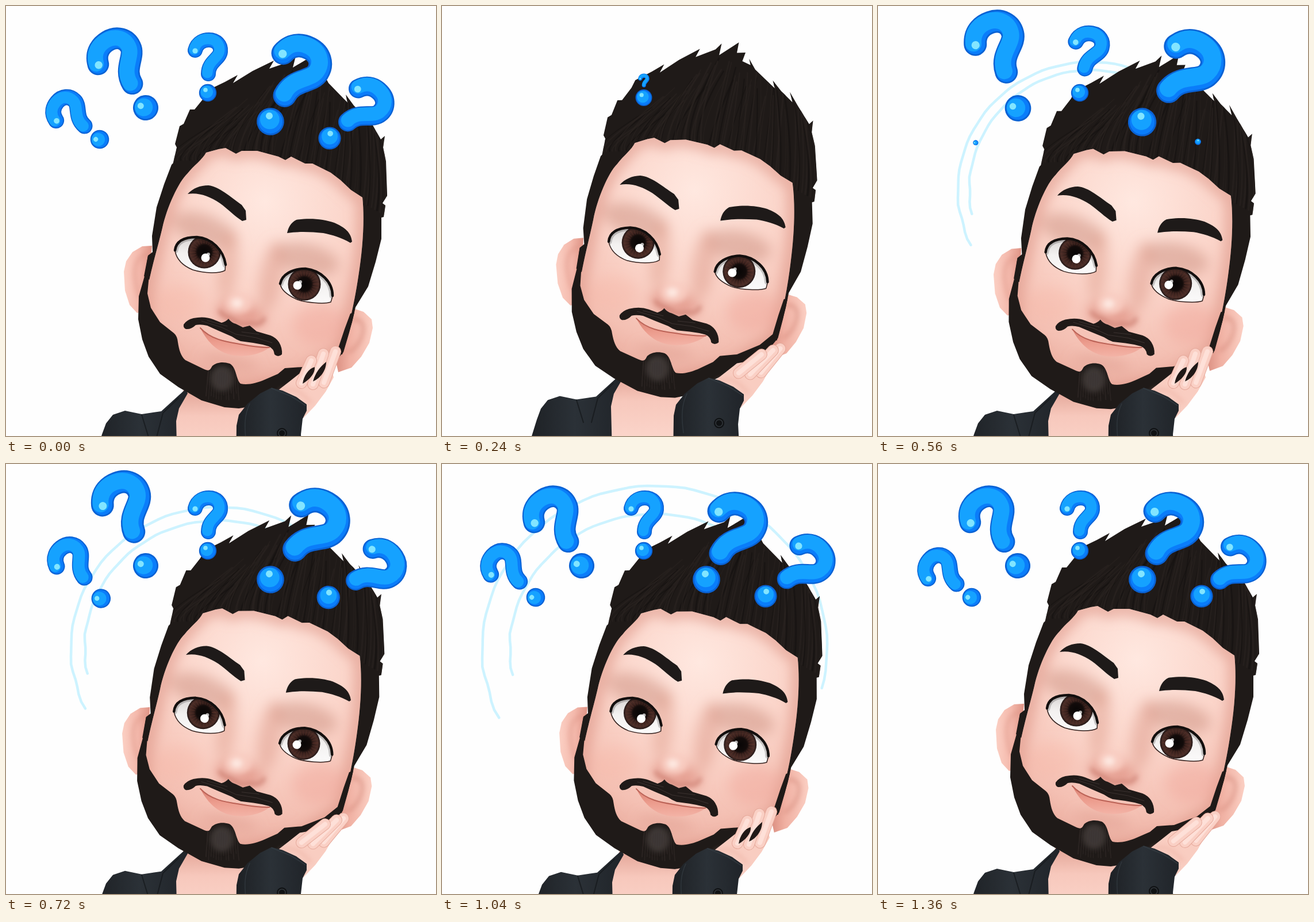
An HTML page for the animation above (1.44 s loop, 748 by 748 pixels).

```html
<!DOCTYPE html>
<html lang="en">
<head>
<meta charset="utf-8">
<title>Thinking</title>
<style>
html, body { margin: 0; width: 100%; height: 100%; overflow: hidden; background: #fefefe; }
svg { display: block; width: 100%; height: 100%; }
</style>
</head>
<body>
<svg viewBox="0 0 748 748" stroke-linecap="round" stroke-linejoin="round">
  <defs>
    <radialGradient id="skin" gradientUnits="userSpaceOnUse" cx="450" cy="340" r="335">
      <stop offset="0" stop-color="#ffe8e0"/><stop offset=".45" stop-color="#fbd5ca"/>
      <stop offset=".8" stop-color="#f4c0b3"/><stop offset="1" stop-color="#e9ab9d"/>
    </radialGradient>
    <radialGradient id="iris">
      <stop offset="0" stop-color="#090606"/><stop offset=".42" stop-color="#120b0a"/>
      <stop offset=".6" stop-color="#38201c"/><stop offset=".85" stop-color="#4b2d27"/>
      <stop offset="1" stop-color="#241817"/>
    </radialGradient>
    <linearGradient id="white" x2="0" y2="1">
      <stop offset="0" stop-color="#d8d4d3"/><stop offset=".45" stop-color="#f3f1f0"/><stop offset="1" stop-color="#fbfafa"/>
    </linearGradient>
    <linearGradient id="ear" x2="1" y2="0">
      <stop offset="0" stop-color="#fbcfc3"/><stop offset=".55" stop-color="#f4b9ac"/><stop offset="1" stop-color="#df9486"/>
    </linearGradient>
    <linearGradient id="earR" x1="1" x2="0" y2="0">
      <stop offset="0" stop-color="#fbcfc3"/><stop offset=".6" stop-color="#f0b0a2"/><stop offset="1" stop-color="#d88b7d"/>
    </linearGradient>
    <linearGradient id="neckFill" x2="0" y2="1">
      <stop offset="0" stop-color="#dd9b8d"/><stop offset=".4" stop-color="#f7c8bc"/><stop offset="1" stop-color="#fcd9cf"/>
    </linearGradient>
    <linearGradient id="lip" x2="0" y2="1">
      <stop offset="0" stop-color="#d97f70"/><stop offset=".5" stop-color="#ec9c8d"/><stop offset="1" stop-color="#f3b3a6"/>
    </linearGradient>
    <linearGradient id="cloth" x2="1" y2="0">
      <stop offset="0" stop-color="#1d2024"/><stop offset=".5" stop-color="#2b3137"/><stop offset="1" stop-color="#202429"/>
    </linearGradient>
    <filter id="soft" x="-60%" y="-60%" width="220%" height="220%"><feGaussianBlur stdDeviation="11"/></filter>
    <filter id="faint" x="-60%" y="-60%" width="220%" height="220%"><feGaussianBlur stdDeviation="4"/></filter>
    <path id="hairShape" d="M240,470 L247,434 255,428 254,400 262,350 275,310 288,276 302,262 290,276 297,246 294,240 302,209 309,205 320,180 328,180 345,159 352,146 381,132 403,120 395,134 429,113 466,95 458,109 493,97 504,87 499,107 516,97 534,86 530,104 545,104 539,119 553,126 551,115 561,134 594,168 591,154 605,173 624,193 620,175 633,199 652,232 659,226 656,246 661,270 662,300 663,330 655,343 660,347 657,367 653,368 653,405 643,445 630,488 608,524 602,550 585,606 430,600Z"/>
    <path id="faceShape" d="M348,255 L370,249 382,247 400,257 410,252 437,252 474,262 486,268 496,262 520,274 533,274 547,281 565,290 582,303 600,320 620,333 C624,370 621,420 613,470 C607,510 598,555 582,602 L510,650 400,675 300,645 240,560 245,500 C250,465 264,420 272,386 C280,350 300,306 316,291 C326,278 342,267 348,255Z"/>
    <path id="eyeL" d="M294,426 C296,408 312,402 332,402 C358,404 378,424 382,448 L381,460 C370,466 345,465 325,459 C308,452 297,442 294,426Z"/>
    <path id="eyeR" d="M477,484 C480,467 498,457 521,457 C548,460 568,480 569,502 L565,515 C553,519 520,516 505,510 C488,502 479,494 477,484Z"/>
    <path id="beardShape" d="M259,430 L247,435 241,470 231,505 230,545 237,580 248,610 268,640 300,663 340,686 380,698 405,700 430,696 462,676 520,651 562,631 587,602 597,568 606,533 599,535 589,562 578,595 555,613 515,628 485,630 473,640 450,650 C436,656 420,660 408,657 C400,650 401,628 389,622 C377,618 366,620 359,626 C355,632 355,637 343,631 L312,616 C304,609 301,598 299,585 Q298,574 292,569 L268,550 252,525 246,500 249,468Z"/>
    <clipPath id="hairClip"><use href="#hairShape"/></clipPath>
    <clipPath id="faceClip"><use href="#faceShape"/></clipPath>
    <clipPath id="beardClip"><use href="#beardShape"/></clipPath>
    <clipPath id="clipL"><use href="#eyeL"/></clipPath>
    <clipPath id="clipR"><use href="#eyeR"/></clipPath>
  </defs>
  <rect width="748" height="748" fill="#fefefe"/>
  <g id="rings" fill="none" stroke="#cdf3ff" stroke-width="4.5"></g>

  <g id="body">
    <path d="M314,655 L300,690 284,800 430,800 414,690Z" fill="url(#neckFill)"/>
    <path d="M150,800 L167,745 174,726 186,711 207,704 236,710 270,705 292,685 313,666 316,674 301,700 296,722 298,800Z" fill="url(#cloth)"/>
    <path d="M300,682 L273,708 262,750 M236,711 L248,750" fill="none" stroke="#15181b" stroke-width="2" opacity=".7"/>
  </g>

  <g id="head">
    <path d="M254,417 L237,418 220,428 209,444 205,462 207,495 215,520 228,534 245,530Z" fill="url(#ear)"/>
    <path d="M246,432 C225,436 221,460 226,482 C228,498 232,505 236,508" fill="none" stroke="#d98f80" stroke-width="5" opacity=".55" filter="url(#faint)"/>
    <path d="M604,526 L622,532 636,545 638,560 632,586 618,610 601,629 578,637 570,600Z" fill="url(#earR)"/>
    <path d="M604,545 C622,544 625,560 618,577 C612,592 603,598 597,602" fill="none" stroke="#cd8071" stroke-width="5" opacity=".6" filter="url(#faint)"/>
    <use href="#hairShape" fill="#1f1a18"/>
    <g id="strands" clip-path="url(#hairClip)" fill="none"></g>
    <use href="#faceShape" fill="url(#skin)"/>
    <g clip-path="url(#faceClip)">
      <g filter="url(#soft)">
        <use href="#faceShape" fill="none" stroke="#d98e7f" stroke-width="22" opacity=".6"/>
        <ellipse cx="345" cy="390" rx="58" ry="27" transform="rotate(20 345 390)" fill="#cf9586" opacity=".55"/>
        <ellipse cx="522" cy="440" rx="58" ry="27" transform="rotate(13 522 440)" fill="#cf9586" opacity=".55"/>
        <ellipse cx="386" cy="450" rx="17" ry="62" transform="rotate(6 386 450)" fill="#e0a090" opacity=".5"/>
        <ellipse cx="462" cy="470" rx="20" ry="62" transform="rotate(10 462 470)" fill="#e0a090" opacity=".55"/>
        <ellipse cx="303" cy="515" rx="42" ry="30" fill="#f5aea0" opacity=".25"/>
        <ellipse cx="545" cy="555" rx="46" ry="34" fill="#f0a598" opacity=".4"/>
        <ellipse cx="409" cy="537" rx="44" ry="21" transform="rotate(14 409 537)" fill="#de8e7f" opacity=".7"/>
        <ellipse cx="390" cy="620" rx="50" ry="11" transform="rotate(10 390 620)" fill="#dd9c8d" opacity=".5"/>
      </g>
    </g>

    <use href="#beardShape" fill="#1f1a18"/>
    <g clip-path="url(#beardClip)">
      <ellipse cx="376" cy="648" rx="20" ry="22" fill="#4a4240" opacity=".75" filter="url(#faint)"/>
      <g id="bristles" fill="none"></g>
    </g>

    <g id="features">
      <g filter="url(#faint)">
        <ellipse cx="404" cy="518" rx="23" ry="18" fill="#fbd0c5" opacity=".8"/>
        <ellipse cx="402" cy="517" rx="10" ry="8" fill="#fff0ea" opacity=".8"/>
        <path d="M372,531 C379,543 389,539 396,547 C407,555 417,555 425,552 C437,556 445,552 449,544" fill="none" stroke="#bf6a5c" stroke-width="6" opacity=".65"/>
      </g>
      <path d="M338,560 C356,579 382,583 406,587 C426,591 441,592 458,594 C444,606 412,613 388,606 C364,599 349,582 338,560Z" fill="url(#lip)"/>
      <path d="M338,560 C356,580 382,584 406,588 C426,592 441,594 458,594" fill="none" stroke="#bb6357" stroke-width="2"/>
      <path d="M309,554 Q314,546 326,543 Q345,539 360,545 L375,551 Q383,549 387,544 Q392,551 400,553 L412,559 424,556 436,566 460,573 Q470,577 475,585 Q481,595 480,606 Q473,612 467,606 Q466,596 457,592 Q444,588 430,586 L408,583 Q400,580 393,575 L370,565 350,556 Q338,553 330,555 Q322,563 313,562 Q308,560 309,554Z" fill="#201a18"/>
      <path d="M340,548 L375,559 400,571 435,577 463,586 M350,547 L385,557 M410,567 L440,571" fill="none" stroke="#3b3230"/>
      <g fill="#1e1a19">
        <path d="M316,327 C325,317 338,312 352,312 C371,314 390,332 410,346 L417,356 418,372 411,374 C397,365 387,354 372,343 C354,331 335,324 316,327Z"/>
        <path d="M489,395 C491,386 495,377 505,372 C530,368 553,371 571,377 C589,385 600,393 602,410 L599,412 C584,403 567,398 552,395 C531,393 510,392 489,395Z"/>
      </g>
      <g id="eyes"></g>
    </g>
  </g>

  <g id="arm">
    <path d="M474,668 L492,654 511,639 540,634 566,632 570,646 556,671 538,695 517,717 500,700Z" fill="#f9cdc1"/>
    <g id="fingers" fill="none"></g>
    <g id="gaps" fill="#201917">
      <path d="M516,657 C518,643 526,631 537,628 C538,639 528,650 516,657Z"/>
      <path d="M534,653 C538,638 546,628 557,619 C557,633 548,647 534,653Z"/>
    </g>
    <path d="M478,670 C500,660 516,674 530,690" fill="none" stroke="#e8a798" stroke-width="5" opacity=".5" filter="url(#faint)"/>
    <path d="M400,800 L401,730 405,711 420,692 442,674 462,664 481,669 505,680 523,693 523,704 516,718 513,745 516,800Z" fill="url(#cloth)"/>
    <path d="M462,665 L496,679 521,695 M424,692 C415,710 414,730 418,760" fill="none" stroke="#3a4148" stroke-width="1.5" opacity=".6"/>
    <circle cx="480" cy="743" r="9" fill="#101214"/>
    <circle cx="480" cy="743" r="6" fill="none" stroke="#33383d" stroke-width="1.5"/>
  </g>
  <g id="marks"></g>
</svg>
<script>
const LOOP = 1440, STEP = 80;
const $ = id => document.getElementById(id);
const NS = 'http://www.w3.org/2000/svg';

function add(parent, tag, attrs) {
  const el = document.createElementNS(NS, tag);
  for (const k in attrs) el.setAttribute(k, attrs[k]);
  return parent.appendChild(el);
}

// linear interpolation through [position, value] pairs
function at(keys, t) {
  if (t <= keys[0][0]) return keys[0][1];
  for (let i = 1; i < keys.length; i++) {
    const [t0, v0] = keys[i - 1], [t1, v1] = keys[i];
    if (t <= t1) return v0 + (v1 - v0) * (t - t0) / (t1 - t0);
  }
  return keys[keys.length - 1][1];
}

let seed = 7;
const rnd = () => (seed = seed * 16807 % 2147483647) / 2147483647;

// hair strands fan out from the hairline towards the crest
for (let i = 0; i < 74; i++) {
  const x = 285 + i * 5.2 + rnd() * 4;
  const y = x < 490 ? 268 : 270 + (x - 490) * .55;
  const tx = 500 + (x - 470) * .75 + rnd() * 20, ty = 105 + Math.abs(tx - 510) * .6 + rnd() * 40;
  add($('strands'), 'path', {
    d: `M${x},${y} Q${x + (x < 470 ? -6 : 8)},${(y + ty) / 2 + 20} ${tx},${ty}`,
    stroke: i % 3 ? '#2a2320' : '#151210', 'stroke-width': 1 + rnd() * 2.2, opacity: .6
  });
}
for (let i = 0; i < 14; i++) {
  const x = 350 + i * 4;
  add($('bristles'), 'path', {
    d: `M${x + 2},${628 + rnd() * 12} Q${x},655 ${x - 2 + i * .4},${672 + rnd() * 14}`,
    stroke: '#3a322f', 'stroke-width': 1 + rnd(), opacity: .45
  });
}

function eye(side, x, y, lid, glint) {
  const g = $('eyes');
  add(g, 'use', { href: '#eye' + side, fill: 'url(#white)' });
  const ball = add(g, 'g', { 'clip-path': `url(#clip${side})` });
  add(ball, 'circle', { cx: x, cy: y, r: 28.5, fill: 'url(#iris)' });
  for (let a = 0; a < 6.28; a += .26) {
    const c = Math.cos(a), s = Math.sin(a);
    add(ball, 'path', { d: `M${x + 15 * c},${y + 15 * s} L${x + 25 * c},${y + 25 * s}`, stroke: '#754236', opacity: .35 });
  }
  add(ball, 'path', { d: lid, fill: 'none', stroke: '#0d0909', 'stroke-width': 11, opacity: .2 });
  add(g, 'use', { href: '#eye' + side, fill: 'none', stroke: '#33211e', 'stroke-width': 1.5 });
  add(g, 'path', { d: lid, fill: 'none', stroke: '#130f0e', 'stroke-width': 4.5 });
  add(g, 'circle', { cx: glint[0], cy: glint[1], r: 7.5, fill: '#fff' });
  add(g, 'circle', { cx: glint[0] + 5, cy: glint[1] - 6, r: 3, fill: '#fff', opacity: .7 });
}
eye('L', 345, 428, 'M294,425 C296,408 312,402 332,402 C358,404 378,424 382,450', [347, 438]);
eye('R', 519, 484, 'M477,483 C480,467 498,457 521,457 C548,460 568,480 568,504', [507, 486]);

// base, resting tip, outstretched tip
const FINGERS = [[553, 655, 573, 601, 587, 614], [534, 658, 552, 605, 575, 617], [514, 656, 531, 617, 555, 624]]
  .map(p => ({
    p,
    lines: [['#e6a99b', 20], ['#fad0c5', 18], ['#fee0d8', 8]].map(([stroke, w]) =>
      add($('fingers'), 'path', { stroke, 'stroke-width': w }))
  }));

const HOOK = 'M-22,-74 C-18,-89 -6,-92 2,-92 C15,-92 23,-83 22,-72 C21,-59 1,-54 1,-33';
// x, y, angle, size, start time
const MARKS = [
  [163, 232, -50, 1.07, 560], [243, 177, -31, 1.45, 320], [351, 151, 0, 1, 160],
  [460, 201, 27, 1.57, 320], [563, 230, 46.5, 1.29, 560]
].map(([x, y, angle, size, start]) => {
  const g = add($('marks'), 'g', {});
  const hook = add(g, 'g', { fill: 'none' }), dot = add(g, 'g', {});
  const layer = (color, w, r, shift) => {
    const transform = `translate(${-shift},${-shift})`;
    add(hook, 'path', { d: HOOK, stroke: color, 'stroke-width': w, transform });
    add(dot, 'circle', { r, fill: color, transform });
  };
  layer('#0a62d4', 26, 15.2, 0);
  layer('#0a7dfa', 22.4, 13.3, 0);
  layer('#15a2ff', 18.4, 10.8, 1.7);
  add(hook, 'circle', { cx: -22, cy: -73, r: 4.6, fill: '#82e5ff' });
  add(dot, 'circle', { cx: -4, cy: -5, r: 3.8, fill: '#82e5ff' });
  return { x, y, angle, size, start, g, hook, dot };
});
// hook size, turn and rise, then dot size and drop, by age in steps
const GROW = [[0, 0], [1, .28], [2, 1.03], [3, 1.06], [4, 1.07], [5, 1.05], [7, 1]];
const TURN = [[0, 0], [1, 0], [2, 11], [3, 12], [5, 10.5], [6, 3], [7, 0]];
const RISE = [[0, 0], [1, 4], [2, 7], [3, 10], [4, 10.5], [5, 8.5], [6, 3], [7, 0]];
const DOT = [[0, .28], [1, .95], [2, 1.03], [4, 1.04], [5, 1]];
const SINK = [[0, 9], [1, 8.5], [2, 3], [3, 1], [4, 0]];

const RINGS = [
  { rx: [[320, 120], [400, 195], [560, 211], [720, 233], [1040, 252], [1200, 258]], k: .6, b: 82, end: .2 },
  { rx: [[400, 110], [480, 180], [560, 231], [720, 257], [1040, 300], [1200, 308]], k: .86, b: 24, end: .43 }
].map(r => ({ ...r, el: add($('rings'), 'path', {}) }));

const LIFT = [[0, 0], [80, -15], [160, -20], [240, -20.5], [400, -11], [560, 0], [720, 3], [880, 5], [1040, 4.5], [1200, 2.5], [1360, 0]];
const TILT = [[0, 0], [80, .019], [160, .027], [240, .029], [400, .023], [560, .0175], [720, .013], [1040, .004], [1200, .001], [1360, 0]];

function drawRing(ring, t) {
  const on = t >= ring.rx[0][0] && t <= 1200;
  ring.el.setAttribute('visibility', on ? 'visible' : 'hidden');
  if (!on) return;
  const rx = at(ring.rx, t), ry = rx * ring.k + ring.b;
  const from = Math.PI - Math.asin(ring.end), to = 2 * Math.PI + .25;
  let d = '';
  for (let i = 0; i <= 70; i++) {
    const a = from + (to - from) * i / 70;
    const w = 1 + (i < 8 ? .006 : .002) * Math.sin(i * 1.3);
    d += `${i ? 'L' : 'M'}${(370 + rx * w * Math.cos(a)).toFixed(1)},${(320 + ry * w * Math.sin(a)).toFixed(1)}`;
  }
  ring.el.setAttribute('d', d);
}

function drawMark(m, t) {
  const age = t === 0 ? 99 : (t - m.start) / STEP;
  m.g.setAttribute('visibility', age >= 0 ? 'visible' : 'hidden');
  if (age < 0) return;
  m.g.setAttribute('transform', `translate(${m.x},${m.y}) rotate(${m.angle}) scale(${m.size})`);
  m.hook.setAttribute('transform', `rotate(${at(TURN, age)}) translate(0,${-at(RISE, age)}) scale(${at(GROW, age)})`);
  m.dot.setAttribute('transform', `translate(0,${at(SINK, age) / m.size}) scale(${at(DOT, age)})`);
}

function draw(t) {
  const lift = at(LIFT, t), c = at(TILT, t);
  $('head').setAttribute('transform', `matrix(1,${-1.1 * c},${c},1,${-690 * c},${lift + 511 * c})`);
  $('features').setAttribute('transform', `translate(${130 * c},0)`);
  $('body').setAttribute('transform', `translate(${lift < 0 ? lift * .1 : 0},${lift * 1.25})`);
  $('arm').setAttribute('transform', `translate(${lift < 0 ? -lift * .1 : 0},${lift * .85})`);

  // fingers drum on the cheek
  const wave = (1 + Math.cos((t - 720) / 560 * 2 * Math.PI)) / 2;
  const s = Math.min(1, Math.max(0, (wave - .38) / .5)), reach = s * s * (3 - 2 * s);
  for (const { p, lines } of FINGERS) {
    const x = p[2] + (p[4] - p[2]) * reach, y = p[3] + (p[5] - p[3]) * reach;
    for (const l of lines) l.setAttribute('d', `M${p[0]},${p[1]} L${x},${y}`);
  }
  $('gaps').setAttribute('opacity', reach < .3 ? 1 : 0);

  RINGS.forEach(r => drawRing(r, t));
  MARKS.forEach(m => drawMark(m, t));
}

const t0 = performance.now();
function tick() {
  const t = (performance.now() - t0) % LOOP;
  draw(Math.floor(t / STEP) * STEP);
  requestAnimationFrame(tick);
}
tick();
</script>
</body>
</html>
```
